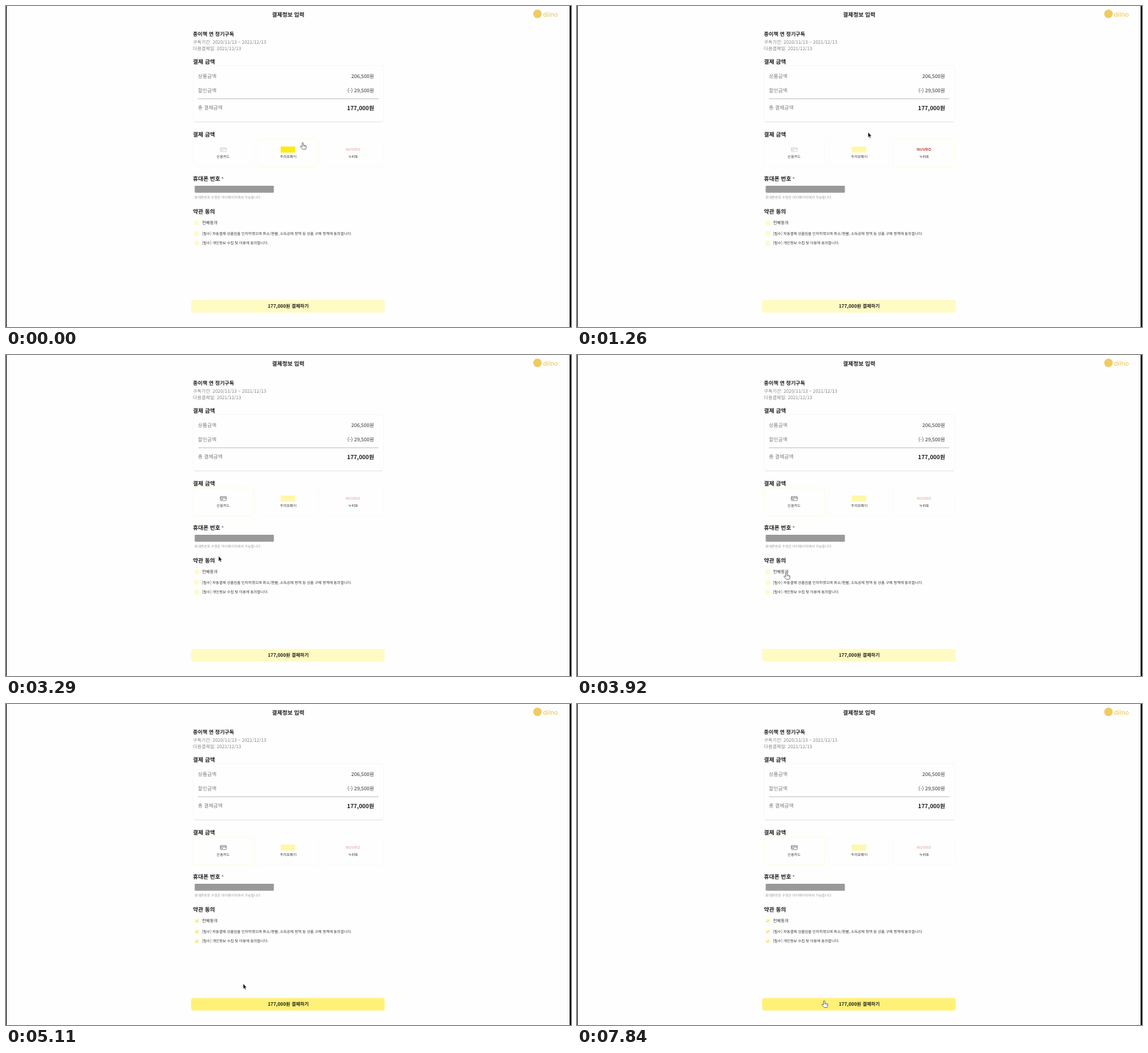
These frames come from a looping animation (792 px wide and 450 px high, 8 s). An HTML page:

```html
<!DOCTYPE html>
<html lang="ko">
<head>
<meta charset="utf-8">
<title>결제정보 입력</title>
<style>
  html, body { margin: 0; width: 100%; height: 100%; overflow: hidden; background: #fefefe; }
  svg { display: block; width: 100%; height: 100%; }
  text { font-family: "Noto Sans CJK KR", "Noto Sans CJK", "Noto Sans", sans-serif; fill: #333; text-rendering: geometricPrecision; }
  .end { text-anchor: end; }
  .mid { text-anchor: middle; }
  .head { font-size: 7.85px; font-weight: 700; fill: #1c1c1c; }
  .plan { font-size: 7.3px; }
  .period { font-size: 6.5px; fill: #858585; }
  .item { font-size: 7.06px; fill: #777; }
  .price { font-size: 7.06px; }
  .total { font-size: 7.95px; }
  .label { font-size: 4.95px; }
  .note { font-size: 4.82px; fill: #999; }
  .all { font-size: 6px; }
  .term { font-size: 5.18px; }
  .frame { fill: #fefefe; stroke: #fbfbfb; }
  .mark { opacity: .35; }
  .card.on .frame { stroke: #fffce0; }
  .card.on .mark { opacity: 1; }
  .tick { fill: none; stroke: #d9bf3c; stroke-width: .8; visibility: hidden; }
  .box { fill: #fffaca; }
  .pay { fill: #fffbc2; stroke: #fffcd0; }
  .agreed .tick { visibility: visible; }
  .agreed .pay { fill: #fff176; stroke: #fff59a; }
</style>
</head>
<body>
<svg id="stage" viewBox="0 0 792 450">
  <rect width="792" height="450" fill="#fefefe"/>
  <rect width="1" height="450" fill="#222"/>
  <rect x="790" width="2" height="450" fill="#111"/>

  <text class="head mid" x="395.5" y="15">결제정보 입력</text>
  <circle cx="745" cy="11" r="6" fill="#efcb62"/>
  <text x="752.8" y="15" style="font: 500 9px Inter, sans-serif; fill: #efcb62">dilno</text>

  <text class="head plan" x="262" y="42.4">종이책 연 정기구독</text>
  <text class="period" x="262" y="53.4">구독기간: 2020/11/13 ~ 2021/12/13</text>
  <text class="period" x="262" y="62.2">다음결제일: 2021/12/13</text>

  <text class="head" x="262" y="80.9">결제 금액</text>
  <rect x="262.5" y="83.5" width="267" height="79" rx="4" fill="none" stroke="#f8f8f8"/>
  <path d="M264 162.5H528" stroke="#e6e6e6"/>
  <text class="item" x="269" y="101.2">상품금액</text>
  <text class="price end" x="516" y="101.2">206,500원</text>
  <text class="item" x="269" y="120.7">할인금액</text>
  <text class="price end" x="516" y="120.7">(-) 29,500원</text>
  <path d="M269 130H522" stroke="#d4d4d4" stroke-width="1.4"/>
  <text class="item" x="269" y="145.2">총 결제금액</text>
  <text class="head total end" x="516" y="146">177,000원</text>

  <text class="head" x="262" y="183">결제 금액</text>
  <g class="card">
    <rect class="frame" x="262.5" y="186.5" width="85" height="39" rx="3"/>
    <g class="mark">
      <rect x="300.4" y="198.4" width="8.4" height="5.6" rx=".6" fill="#fff" stroke="#777" stroke-width=".8"/>
      <path d="M300 200.3h9.2M301.6 202.4h2.4" stroke="#666" stroke-width=".9"/>
    </g>
    <text class="label mid" x="304.2" y="212.6">신용카드</text>
  </g>
  <g class="card">
    <rect class="frame" x="352.5" y="186.5" width="85" height="39" rx="3"/>
    <rect class="mark" x="385" y="197" width="20.5" height="8.5" fill="#fbec10"/>
    <text class="label mid" x="395.6" y="212.6">두리모페이</text>
  </g>
  <g class="card">
    <rect class="frame" x="443.5" y="186.5" width="86" height="39" rx="3"/>
    <text class="mark mid" x="486.4" y="203.2" style="font: 700 5.5px Inter, sans-serif; fill: #c0503f">NUVRO</text>
    <text class="label mid" x="486.7" y="212.6">누비토</text>
  </g>

  <text class="head" x="262" y="245.3">휴대폰 번호</text>
  <text x="301.8" y="245.8" font-size="8" style="fill: #667">*</text>
  <rect x="264.5" y="252" width="111" height="9.8" rx="1.2" fill="#999"/>
  <text class="note" x="264" y="270">휴대폰번호 수정은 마이페이지에서 가능합니다</text>

  <text class="head" x="262" y="291">약관 동의</text>
  <g id="checks"></g>
  <text class="all" x="274.7" y="306.3">전체동의</text>
  <text class="term" x="274.7" y="320.7">[필수] 자동결제 상품임을 인지하였으며 취소/환불, 소득공제 정책 등 상품 구매 정책에 동의합니다.</text>
  <text class="term" x="274.7" y="334.2">[필수] 개인정보 수집 및 이용에 동의합니다.</text>

  <rect class="pay" x="259.7" y="412.3" width="271" height="17.2" rx="3"/>
  <text class="head mid" x="395.6" y="422.8" style="font-size: 6.57px">177,000원 결제하기</text>

  <g id="cursor">
    <g id="hand" fill="#fff" stroke="#555" stroke-width=".75" stroke-linejoin="round">
      <path d="M-1 6V.9a.95.95 0 0 1 1.9 0V3.6l3.2.6q1.1.3 1 1.5L4.6 8.1l-.5 1.3H0L-3.1 6.1q-.7-1 .2-1.4.8-.2 1.9 1.3z"/>
      <path d="M1 3.8v1.6M2.6 4v1.5M4 4.4v1.3" stroke-width=".5"/>
    </g>
    <path id="arrow" d="M0 0V7.2L1.6 5.8 2.7 8.3 3.9 7.8 2.8 5.3H5z" fill="#111" stroke="#fff" stroke-width=".4"/>
  </g>
</svg>
<script>
  const LOOP = 8000, STEP = 70;
  const byId = id => document.getElementById(id);
  const cards = document.querySelectorAll('.card');

  byId('checks').innerHTML = [304, 319, 332.5].map(y =>
    `<rect class="box" x="264.1" y="${y - 3.3}" width="6.7" height="6.6" rx="1.8"/>
     <path class="tick" d="M265.8 ${y}l1.3 1.4 2.2-2.8"/>`).join('');

  // start time, number of steps, destination
  const start = [416, 191.6];
  const moves = [
    [70, 5, 476.5, 191],
    [980, 5, 408, 177],
    [1470, 11, 342.5, 188],
    [2940, 6, 298, 282],
    [3360, 6, 292.5, 300.5],
    [3780, 3, 293.5, 305],
    [4550, 4, 321.5, 373.5],
    [4970, 12, 346.5, 416]
  ];
  // clickable areas: left, top, right, bottom
  const links = [
    [262, 186, 348, 226], [352, 186, 438, 226], [443, 186, 530, 226],
    [262, 299, 300, 337], [260, 412, 531, 430]
  ];
  const easeOut = p => 1 - (1 - p) ** 2;

  function cursorAt(t) {
    let [x, y] = start;
    for (const [begin, steps, toX, toY] of moves) {
      if (t < begin) break;
      const done = Math.min(steps, Math.floor((t - begin) / STEP) + 1);
      const p = easeOut(done / steps);
      x += (toX - x) * p;
      y += (toY - y) * p;
    }
    return [x, y];
  }

  function draw(t) {
    const chosen = t < 560 ? 1 : t < 2380 ? 2 : 0;
    cards.forEach((card, i) => card.classList.toggle('on', i === chosen));
    byId('stage').classList.toggle('agreed', t >= 4270);

    const [x, y] = cursorAt(t);
    const over = links.some(([l, top, r, b]) => x >= l && x <= r && y >= top && y <= b);
    byId('cursor').setAttribute('transform', `translate(${x} ${y})`);
    byId('hand').style.display = over ? '' : 'none';
    byId('arrow').style.display = over ? 'none' : '';
  }

  const origin = performance.now();
  function tick() {
    draw((performance.now() - origin) % LOOP);
    requestAnimationFrame(tick);
  }
  tick();
</script>
</body>
</html>
```
